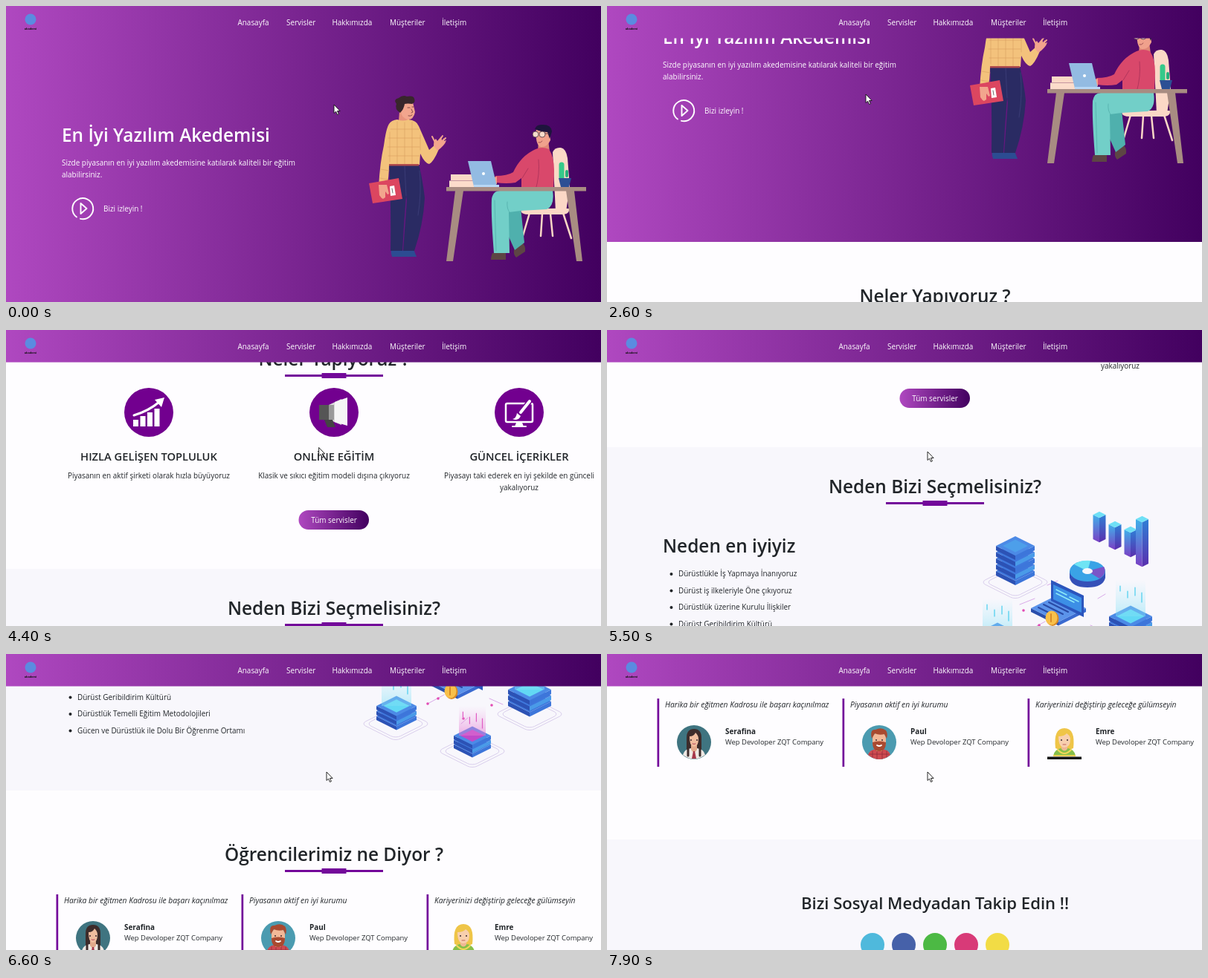
Recreate the animation shown at these times as an HTML page. Size 800 by 399 pixels, loop 8 s.

```html
<!DOCTYPE html>
<html lang="tr">
<head>
<meta charset="utf-8">
<title>Yazılım Akademisi</title>
<style>
html, body { margin: 0; width: 100%; height: 100%; overflow: hidden; background: #fefdff; }
svg { display: block; width: 800px; height: 399px; }
text { font-family: "Open Sans", "Noto Sans", sans-serif; font-size: 9.94px; fill: #212529; }
.w { fill: #fff; }
.h1 { font-size: 24.4px; font-weight: 600; }
.h3 { font-size: 22.1px; font-weight: 600; }
.h4 { font-size: 14.7px; font-weight: 600; }
.c { text-anchor: middle; }
.i { font-style: italic; font-size: 10.3px; }
.b { font-weight: 700; }
.s { font-size: 9.45px; }
.line { fill: none; stroke-linecap: round; stroke-linejoin: round; }
</style>
</head>
<body>
<svg id="stage" viewBox="0 0 800 399"></svg>
<script>
const text = (x, y, s, cls = '') => `<text x="${x}" y="${y}" class="${cls}">${s}</text>`;
const path = (d, fill, more = '') => `<path d="${d}" fill="${fill}" ${more}/>`;
const line = (d, color, w = 1) => `<path d="${d}" class="line" stroke="${color}" stroke-width="${w}"/>`;
const rect = (x, y, w, h, fill, rx = 0) => `<rect x="${x}" y="${y}" width="${w}" height="${h}" rx="${rx}" fill="${fill}"/>`;
const oval = (x, y, rx, ry, fill) => `<ellipse cx="${x}" cy="${y}" rx="${rx}" ry="${ry}" fill="${fill}"/>`;
const dot = (x, y, r, fill) => oval(x, y, r, r, fill);
const title = (y, s) => text(441, y, s, 'h1 c') + rect(375, y + 12, 132, 3, '#73089a') + rect(424.5, y + 10, 33, 7, '#73089a');

// Man standing with a book
function standing() {
  const skin = '#f2a58d', wool = '#f3c27c', navy = '#2a2b63';
  return path('M518 328l14 1 18 7v2h-31q-2-5-1-10zM535 328h13l4 10h-15z', '#2c4c92')
    + path('M515 213h40q6 26 8 46-2 36-14 71h-15l5-68-1-6q-3 36-5 74h-16q1-62-2-117z', navy)
    + line('M536 216l2 40M556 222q3 30-2 60', '#454783', .6)
    + path('M529 142h13v13q-7 4-14 0z', '#e8937d')
    + path('M531 133q8-7 16-3l3 13q-2 10-9 10-10-2-10-11z', skin)
    + path('M530 144q-8-5-5-12-5-6 3-8 6-5 11-2 9-2 10 3 2 5-3 7-6-1-10 0-1 7-6 12z', '#38262c')
    + line('M540 137h3M546 136h2M541 148q3 1 5-1M545 139l2 4-2 1', '#6b3338', .8)
    + path('M526 153q8 3 15 0 11 1 14 9l14 32 8-7 5 6q-7 17-13 20-6-1-12-14l-1 15h-41q0 17-3 29h-11q2-33 7-55 3-23 7-29 3-5 11-6z', wool)
    + line('M517 166h38M514 178h43M513 190h43M514 202h42M526 156v57M536 157v57M546 156v57M504 220l11 2M503 232l10 2M516 170v40M557 174v20', '#d99f60', .6)
    + rect(515, 213, 40, 2.5, '#b04b4d')
    + path('M575 189q0-9 3-10l2 3 5-6 1 5 3-3v4l3-1q-2 7-12 14z', skin)
    + line('M577 184l-4-8M583 181l4-6M587 182l4-4', skin, 2)
    + path('M488 239l40-7 5 28-40 6z', '#dc4660')
    + path('M516 243l6-1 2 13-7 1z', '#fff') + line('M519 246l1 6', '#444', .8)
    + path('M501 241h11l3 12-2 1-3-4v8l-3 2-2-1-3-4z', skin);
}

// Man sitting behind a desk
function seated() {
  const skin = '#f0a18c', red = '#d9486b', teal = '#72cfc8', wood = '#a88c82', cream = '#fbd8c6';
  return path('M735 197q3-7 11-6 7 1 9 14l3 38-5 34h-14z', cream)
    + line('M704 279l-10 34M749 279l11 34M721 280l-2 30M732 280l3 30', cream, 2.5)
    + path('M692 275q35-3 65-2 1 8-10 8h-44q-11 0-11-6z', cream)
    + path('M654 333h18v9h-20q0-5 2-9zM683 329l11-10q5 4 4 12l-12 8q-4-4-3-10z', '#5d4544')
    + path('M672 278l20-6 5 47-13 10-12-27z', '#4fb0ad')
    + path('M664 249h71q3 20-8 25l-35 2-16 2 1 55h-21q-4-50-3-73 2-11 11-11z', teal)
    + line('M677 278q-4-5-3-14M657 262l2 68', '#4fa9a7', .7)
    + path('M716 180h13l2 17h-16z', '#df8877')
    + path('M713 165h18l1 16q-5 10-13 9-8-3-6-25z', skin)
    + path('M711 166q2-7 11-6 11 0 12 9l-3 10-3-9q-8 0-17-4z', '#1e143d')
    + `<g fill="#f8dccb" stroke="#4a3440" stroke-width=".8"><circle cx="712" cy="173" r="4"/><circle cx="721" cy="173" r="4"/><path d="M725 172h6"/></g>`
    + line('M716 184q3 1 5-2', '#8d3b45', .8)
    + path('M712 193q9-4 18 0 7 10 7 29l-1 26h-43v-16l-8 6q-12 2-26 0l-1-9q16 0 24-5 10-22 30-31z', red)
    + line('M694 232l8-13M716 207q2 20-4 41', '#a83058', .8)
    + path('M660 230l-11 2 1 7 10 1z', skin)
    + path('M604 249h11l-14 95h-9zM753 249h11l11 95h-8z', wood)
    + rect(592, 244, 188, 5.5, wood)
    + rect(598, 227, 37, 8, cream) + rect(596, 235.5, 41, 8.5, '#fcdccb')
    + line('M598 235.5h37', '#d5aca0', .6)
    + path('M621 209h31l8 34h-31z', '#93bbe2') + path('M629 241h34v3h-34z', '#b8d7f5') + dot(642, 226, 2, '#fff')
    + line('M747 231v-17', '#35c98a', 7) + line('M754 229v-6', '#25b07b', 4)
    + path('M743 232h17l-3 12h-11z', '#2c4f94');
}

const hero = () => rect(0, 0, 800, 450, 'url(#purple)')
  + text(75, 183, 'En İyi Yazılım Akedemisi', 'h1 w')
  + text(75, 215, 'Sizde piyasanın en iyi yazılım akedemisine katılarak kaliteli bir eğitim', 'w')
  + text(75, 231, 'alabilirsiniz.', 'w')
  + line('M95 284.5a14 14 0 1 1 5 2.3M100.5 266v14l8-7z', '#fff', 1.9)
  + text(131, 276.5, 'Bizi izleyin !', 'w')
  + standing() + seated();

function services() {
  const item = (x, icon, name, ...rows) => dot(x, 595, 33, '#72008f')
    + `<g transform="translate(${x} 595)">${icon}</g>` + text(x, 660, name, 'h4 c')
    + rows.map((r, i) => text(x, 683.5 + i * 16, r, 'c')).join('');
  const chart = [0, 1, 2, 3].map(i => rect(-21 + i * 9.5, 10 - i * 5, 7, 9 + i * 5, '#fff')).join('')
    + line('M-20 4Q0-2 14-14', '#fff', 3) + path('M8-17l13-3-4 13z', '#fff');
  const horn = path('M-20-10h13v20h-13z', '#555') + path('M-7-10L10-18V17L-7 10z', '#d9d9d9')
    + path('M1-14L18-20V18L1 13z', '#f5f5f5') + path('M-13 10h11l4 10h-11z', '#444') + rect(-7, -10, 7, 20, '#999');
  const screen = `<rect x="-18" y="-12" width="36" height="25" rx="2" fill="none" stroke="#fff" stroke-width="2.5"/>`
    + path('M-4 14h8l2 5h-12z', '#fff') + line('M-9 19H9', '#fff', 2)
    + line('M14-15L0 3', '#72008f', 7) + line('M14-15L2 0', '#fff', 4) + path('M-9 9q5-1 6-8l5 4q-3 7-11 4z', '#fff');
  return title(532, 'Neler Yapıyoruz ?')
    + item(192, chart, 'HIZLA GELİŞEN TOPLULUK', 'Piyasanın en aktif şirketi olarak hızla büyüyoruz')
    + item(441, horn, 'ONLİNE EĞİTİM', 'Klasik ve sıkıcı eğitim modeli dışına çıkıyoruz')
    + item(690, screen, 'GÜNCEL İÇERİKLER', 'Piyasayı taki ederek en iyi şekilde en günceli', 'yakalıyoruz')
    + rect(393.5, 727, 94.5, 26, 'url(#purple)', 13) + text(441, 743.5, 'Tüm servisler', 'w c');
}

// Isometric box: x, y is the centre of its top face
function slab(x, y, w, d, top, left, right) {
  const h = w / 2;
  return path(`M${x - w} ${y}l${w} ${h}v${d}l${-w} ${-h}z`, left)
    + path(`M${x + w} ${y}l${-w} ${h}v${d}l${w} ${-h}z`, right)
    + path(`M${x - w} ${y}l${w} ${-h} ${w} ${h} ${-w} ${h}z`, top);
}
function stack(x, y, w, n, step, d, last = '#62d8f4') {
  let s = '';
  for (let i = n - 1; i >= 0; i--)
    s += slab(x, y + i * step, w, d, i ? '#3f78dd' : '#4c8ae6', '#2c52b5', i % 2 ? '#4a9be8' : '#3d76da');
  return s + slab(x, y, w * .65, 0, last, last, last);
}
const plate = (x, y) => [33, 28].map(a => `<rect transform="translate(${x} ${y}) scale(1 .5) rotate(45)" x="${-a}" y="${-a}" width="${2 * a}" height="${2 * a}" rx="9" fill="none" stroke="#d6c9ea"/>`).join('');
const glow = (x, y, w, h, id, color) => rect(x - w, y, 2 * w, h, `url(#${id})`)
  + [-.7, -.2, .3, .75].map((k, i) => line(`M${x + k * w} ${y + 8 + i * 7 % 12}v${7 + i * 2}`, color, 1.2)).join('');

function network() {
  const bar = (x, top, bottom) => slab(x, top, 8.5, bottom - top - 4, '#6fe0f6', 'url(#barL)', 'url(#barR)');
  const links = 'M592 992l14-6M555 1018l20-8M567 1053l22-12M650 1046l18 8M612 1080l9-8M660 1010l10-6';
  return plate(549, 988) + plate(524, 1080) + plate(704, 1067) + plate(627, 1117)
    + line(links, '#d9a9e8') + [[560, 1026], [567, 1053], [581, 1046], [615, 1073], [653, 1055]].map(p => dot(...p, 1.8, '#e24bb4')).join('')
    + stack(549, 939, 26, 5, 8.5, 6, '#4d9fea')
    + bar(662, 897, 934) + bar(683, 910, 944) + bar(704, 917, 954) + bar(719.5, 903, 967)
    + path('M622 973v9q3 13 24 13t24-13v-9z', '#3550b8') + oval(646, 973, 24, 14, '#3aa3e6')
    + path('M646 973l-18-9q8-6 22-5z', '#6fe4f4') + path('M646 973l22-6q5 9-6 16z', '#7a55c8') + oval(646, 973, 7, 4, '#f8f7fc')
    + slab(607, 1023, 37, 5, '#5b93ea', '#2b4fac', '#3a6ad0')
    + line('M580 1022l26 13M587 1018l26 13M594 1015l26 13', '#2a4ba6', 2)
    + path('M597 985l44 21v29l-44-22z', '#2b55bd') + path('M600 991l38 18v20l-38-18z', '#3c8fe6')
    + line('M604 998l14 7M604 1003l24 12M622 1008l12 6', '#8deaf8', 1.5)
    + oval(599, 1037, 8.5, 10, '#d98a26') + oval(597.5, 1036, 8, 9.5, '#f8c04a') + line('M597 1031v10', '#d98a26', 2)
    + stack(525, 1056, 27, 3, 7, 5) + glow(525, 1010, 20, 46, 'cyan', '#47cdee')
    + stack(704, 1034, 29, 3, 8, 6) + glow(704, 985, 20, 49, 'cyan', '#47cdee')
    + stack(627, 1096, 25, 3, 6, 5, '#c049c9') + glow(627, 1056, 18, 40, 'pink', '#e05cc4');
}

function reasons() {
  const list = ['Dürüstlükle İş Yapmaya İnanıyoruz', 'Dürüst iş ilkeleriyle Öne çıkıyoruz', 'Dürüstlük üzerine Kurulu İlişkiler',
    'Dürüst Geribildirim Kültürü', 'Dürüstlük Temelli Eğitim Metodolojileri', 'Gücen ve Dürüstlük ile Dolu Bir Öğrenme Ortamı'];
  return rect(0, 806, 800, 364, '#f8f7fc') + title(868, 'Neden Bizi Seçmelisiniz?')
    + text(75, 948, 'Neden en iyiyiz', 'h1')
    + list.map((s, i) => dot(86.5, 977 + i * 22.5, 2, '#212529') + text(96, 980 + i * 22.5, s)).join('')
    + network();
}

function students() {
  const eyes = dot(-4, -3, 1, '#3a2930') + dot(4, -3, 1, '#3a2930');
  const woman = dot(0, 0, 23, '#3f7480') + path('M-10 14V-6Q-10-18 0-18T10-6V14z', '#3d2c2b')
    + path('M-15 17q2-8 11-9h8q9 1 11 9-15 11-30 0z', '#efe9e4') + path('M-4 4h8v6l-4 5-4-5z', '#e2a98b')
    + path('M-6-8q6 0 8-5 4 4 4 8 0 11-6 11t-6-14z', '#f0bd9f') + eyes + line('M-2 2q2 1 4 0', '#b8455a')
    + path('M-1 12h2l2 10h-6z', '#a6374a') + line('M-8 8v10M8 8v10', '#3d2c2b', 3);
  const man = dot(0, 0, 23, '#4b9bb0') + path('M-15 17q2-7 11-8h8q9 1 11 8-15 12-30 0z', '#cf4a50')
    + line('M-9 12v8M-3 11v11M4 11v11M10 12v8M-13 16h26', '#8f2c3b', .8) + path('M-4 4h8v8h-8z', '#e8a183')
    + rect(-9, -13, 18, 22, '#f3b897', 8) + path('M-9 0q9-3 18 0 0 12-9 12T-9 0z', '#a94a30')
    + path('M-10-5q-3-13 5-12 8-4 14 1 3 4 1 11l-3-6q-7 2-13-1z', '#a94a30') + eyes + line('M-3 4q3 2 6 0', '#fff', 1.8);
  const blond = path('M-12 8Q-15-19 0-19T12 8q-12 6-24 0z', '#efc548') + path('M-15 18q2-9 11-10h8q9 1 11 10z', '#86bf4a')
    + path('M-4 2h8v7q-4 5-8 0z', '#efb893') + path('M-8-8q8 0 11-4 5 3 5 8 0 11-8 11T-8-8z', '#f8cfae') + eyes
    + line('M-2 3h4', '#c0605a') + line('M-9 10q9 10 18 0', '#f3d75a', 2)
    + rect(-15, 17, 30, 2, '#e9d04f') + rect(-23, 19.5, 46, 3.5, '#111');
  const card = (x, quote, face, name) => rect(x, 1310, 2.7, 92, '#73089a') + text(x + 10.5, 1322, quote, 'i')
    + `<g transform="translate(${x + 49.5} 1369)">${face}</g>`
    + text(x + 91.5, 1357.5, name, 'b') + text(x + 91.5, 1372, 'Wep Devoloper ZQT Company', 's');
  return title(1265, 'Öğrencilerimiz ne Diyor ?')
    + card(67.5, 'Harika bir eğitmen Kadrosu ile başarı kaçınılmaz', woman, 'Serafina')
    + card(316.5, 'Piyasanın aktif en iyi kurumu', man, 'Paul')
    + card(565.5, 'Kariyerinizi değiştirip geleceğe gülümseyin', blond, 'Emre');
}

const social = () => rect(0, 1500, 800, 300, '#f8f7fc')
  + text(441, 1593.5, 'Bizi Sosyal Medyadan Takip Edin !!', 'h3 c')
  + ['#4fb9dc', '#4661a9', '#4cb944', '#d83a78', '#f2dc45'].map((c, i) => dot(357 + i * 42, 1642, 16, c)).join('');

const nav = () => rect(0, 0, 800, 43.5, 'url(#purple)') + dot(33, 18, 7.5, '#5b8be0')
  + `<text x="33" y="32" class="c b" style="font-size:3.8px;fill:#111">akademi</text>`
  + [[311.5, 'Anasayfa'], [377, 'Servisler'], [438.5, 'Hakkımızda'], [516, 'Müşteriler'], [586, 'İletişim']]
    .map(([x, s]) => text(x, 26, s, 'w')).join('');

const grad = (id, a, b, dir = 'x2="1"') => `<linearGradient id="${id}" ${dir}><stop stop-color="${a}"/><stop offset="1" stop-color="${b}"/></linearGradient>`;
const down = 'x2="0" y2="1"';
stage.innerHTML = '<defs>' + grad('purple', '#af48c0', '#42005f') + grad('barL', '#3fb0ea', '#7a3fc4', down)
  + grad('barR', '#2f7fd6', '#5a2fae', down) + grad('cyan', '#9fe9fa00', '#7fdff580', down) + grad('pink', '#f0a0e000', '#e070d090', down)
  + '</defs><g id="page">' + hero() + services() + reasons() + students() + social() + '</g>' + nav()
  + '<g id="cursor">' + path('M0 0v11.5l2.6-2.3 1.9 4.3 1.9-.8-1.9-4.2h3.6z', '#fff', 'stroke="#111" stroke-width=".9"') + '</g>';

// Keys: time, then values
const scrollKeys = [[0, 0], [2000, 0], [2600, 132], [3700, 356], [4600, 520], [5500, 648], [6600, 986], [7900, 1250]];
const cursorKeys = [[0, 441, 133], [450, 320, 22], [900, 450, 22], [1450, 600, 22], [1800, 425, 82], [2000, 349, 114],
  [2500, 348, 119], [3700, 348, 119], [4500, 431, 164], [5500, 431, 164], [5800, 431, 159]];
function at(keys, t) {
  const i = keys.findIndex(k => k[0] > t);
  if (i < 0) return keys[keys.length - 1].slice(1);
  const a = keys[i - 1], b = keys[i], p = (t - a[0]) / (b[0] - a[0]);
  return a.slice(1).map((v, n) => v + (b[n + 1] - v) * p);
}
const page = document.getElementById('page'), cursor = document.getElementById('cursor');
function draw() {
  const t = Math.floor(performance.now() % 8000 / 100) * 100;
  page.setAttribute('transform', `translate(0 ${-Math.round(at(scrollKeys, t)[0])})`);
  cursor.setAttribute('transform', `translate(${at(cursorKeys, t).join(' ')})`);
  requestAnimationFrame(draw);
}
draw();
</script>
</body>
</html>
```
